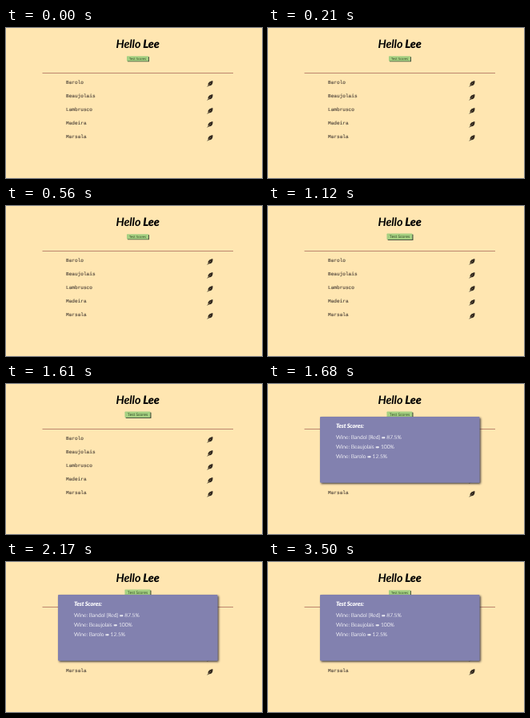
An HTML page that plays this animation: 320x188 px, repeating every 3.78 s.

```html
<!DOCTYPE html>
<html lang="en">
<head>
<meta charset="utf-8">
<title>Wine test scores</title>
<style>
  html, body { margin: 0; width: 100%; height: 100%; overflow: hidden; background: #ffe6b1; }
  svg { display: block; width: 100%; height: 100%; }
  text { text-rendering: geometricPrecision; }
  .script { font: italic 700 14.4px Lato, cursive; letter-spacing: -.15px; }
  .strong { font-weight: 900; }
  .wine { font: 6.1px "Liberation Mono", monospace; fill: #5a4f42; stroke: #5a4f42; stroke-width: .16px; }
  .label { font: 4.1px "Open Sans", sans-serif; fill: #28401f; text-anchor: middle; }
  .score { font: 300 6.7px Lato, sans-serif; fill: #fff; stroke: #fff; stroke-width: .12px; }
  .arrow { font: 700 5.4px "DejaVu Sans", sans-serif; }
</style>
</head>
<body>
<svg viewBox="0 0 320 188">
  <defs>
    <filter id="shadow" x="-5%" y="-5%" width="112%" height="115%">
      <feDropShadow dx="1.3" dy="1.3" stdDeviation=".8" flood-color="#25202a" flood-opacity=".9"/>
    </filter>
    <g id="leaf">
      <path d="M3.3 -3.7 C3.9 0 2.6 3 -2 2.7 C-3.6 -.4 -.8 -2.8 3.3 -3.7Z" fill="#30271d"/>
      <path d="M-3.2 3.7 L-1.8 2.2" stroke="#30271d" stroke-width=".9"/>
      <path d="M-1.8 2.2 Q-.6 .2 1.2 -1" fill="none" stroke="#a58f6c" stroke-width=".5"/>
    </g>
  </defs>
  <text class="script" x="137.5" y="25.3">Hello <tspan class="strong">Lee</tspan></text>
  <path d="M45.5 56.5H284" stroke="#bb866d"/>
  <g id="button">
    <rect x="-13" y="-2.6" width="27" height="6.4" rx=".5" fill="#4a5540"/>
    <rect x="-14" y="-3.3" width="27" height="6.2" rx=".5" fill="#a5d082"/>
    <text class="label" x="-.3" y="1.4">Test Scores</text>
  </g>
  <g id="list"></g>
  <g id="panel">
    <rect x="65" y="41" width="199.5" height="82.7" rx="1" fill="#8281af" filter="url(#shadow)"/>
    <text class="script strong" x="85" y="55.2" fill="#fff" style="font-size:7.4px">Test Scores:</text>
  </g>
</svg>
<script>
  const LOOP = 3780, HOVER_START = 1120, PANEL_START = 1680, HOVER_END = 3500;
  const wines = ["Barolo", "Beaujolais", "Lambrusco", "Madeira", "Marsala"];
  const scores = [["Bandol (Red)", "87.5%"], ["Beaujolais", "100%"], ["Barolo", "12.5%"]];
  const byId = id => document.getElementById(id);
  const button = byId("button"), panel = byId("panel");

  byId("list").innerHTML = wines.map((wine, i) => `
    <text class="wine" x="75" y="${70.2 + 17 * i}">${wine}</text>
    <use href="#leaf" x="255" y="${69.8 + 17 * i}"/>`).join("");

  panel.insertAdjacentHTML("beforeend", scores.map(([wine, score], i) =>
    `<text class="score" x="85" y="${68.8 + 12.1 * i}">Wine: ${wine} <tspan class="arrow">⇛</tspan> ${score}</text>`
  ).join(""));

  function draw(now) {
    const t = now % LOOP;
    const hovered = t >= HOVER_START && t < HOVER_END;
    button.setAttribute("transform", `translate(165 38.5) scale(${hovered ? 1.18 : 1})`);
    panel.setAttribute("visibility", t >= PANEL_START ? "visible" : "hidden");
  }

  const start = performance.now();
  function tick() {
    draw(performance.now() - start);
    requestAnimationFrame(tick);
  }
  tick();
</script>
</body>
</html>
```
